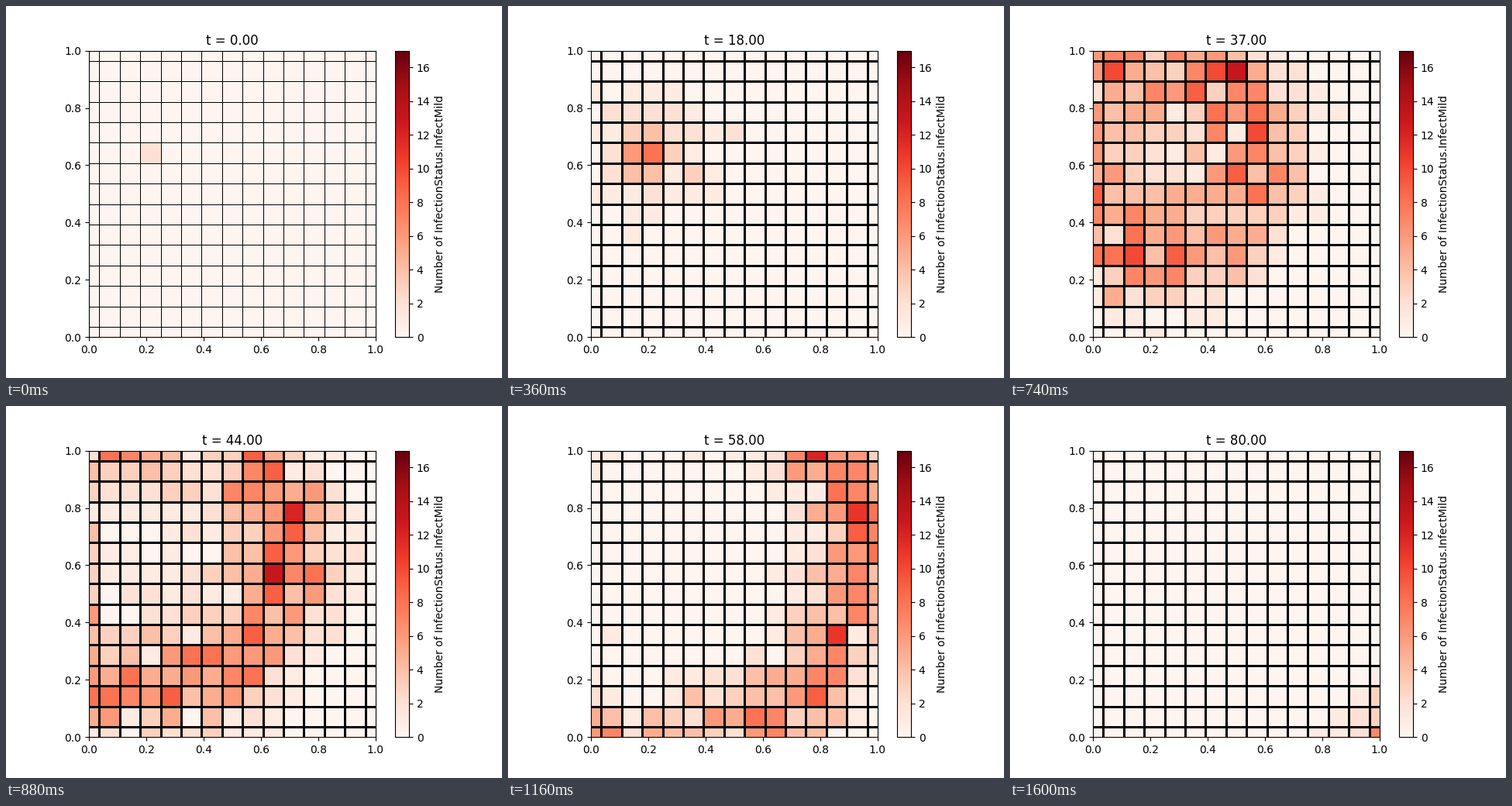
Write a matplotlib script that moves like this. It is 640 px wide and 480 px high and loops after 1.62 s.

```python
import numpy as np
import matplotlib.pyplot as plt
from matplotlib.animation import FuncAnimation

N, STEPS, VMAX = 15, 81, 17
ORIGIN = (3, 9)  # column, row of the first infected cell


def smooth_noise(rng):
    """Unit-variance noise per cell that drifts over a few steps."""
    kernel = np.array([1, 2, 3, 2, 1])
    raw = rng.standard_normal((STEPS + len(kernel) - 1, N, N))
    mix = sum(k * raw[i:i + STEPS] for i, k in enumerate(kernel))
    return mix / np.sqrt((kernel ** 2).sum())


def simulate():
    """Epidemic wave spreading from ORIGIN, as counts[time, row, column]."""
    row, col = np.mgrid[:N, :N]
    dist = np.hypot(col - ORIGIN[0], row - ORIGIN[1])
    t = np.arange(STEPS)[:, None, None]

    # Each cell flares up as the crest arrives, then fades more slowly.
    crest = 22 + 2.6 * dist + 0.09 * dist ** 2
    width = np.where(t < crest, 6, 9 - dist / 4)
    mean = 6.5 * np.exp(-0.5 * ((t - crest) / width) ** 2)
    noise = smooth_noise(np.random.default_rng(7))
    spark = 2 * np.exp(-4 * dist ** 2 - t / 12)
    counts = mean + 0.8 * np.sqrt(mean) * noise + spark
    return np.clip(np.rint(counts), 0, VMAX)


counts = simulate()
fig, ax = plt.subplots(figsize=(6.4, 4.8), dpi=100)
grid = np.linspace(0, 1, N)
mesh = ax.pcolormesh(grid, grid, counts[0], shading="nearest", cmap="Reds",
                     vmin=0, vmax=VMAX, edgecolors="k", linewidth=0.5)
ax.set_aspect("equal")
ax.set_xlim(0, 1)
ax.set_ylim(0, 1)
fig.colorbar(mesh, ax=ax, label="Number of InfectionStatus.InfectMild")
title = ax.text(0.5, 1.01, "", ha="center", va="bottom", fontsize="large",
                transform=ax.transAxes)


def update(step):
    mesh.set_array(counts[step])
    mesh.set_linewidth(1 if step else 0.5)  # the grid starts out thin
    title.set_text(f"t = {step:.2f}")
    return mesh, title


anim = FuncAnimation(fig, update, frames=STEPS, interval=20,
                     repeat=True, repeat_delay=0)
plt.show()
```
